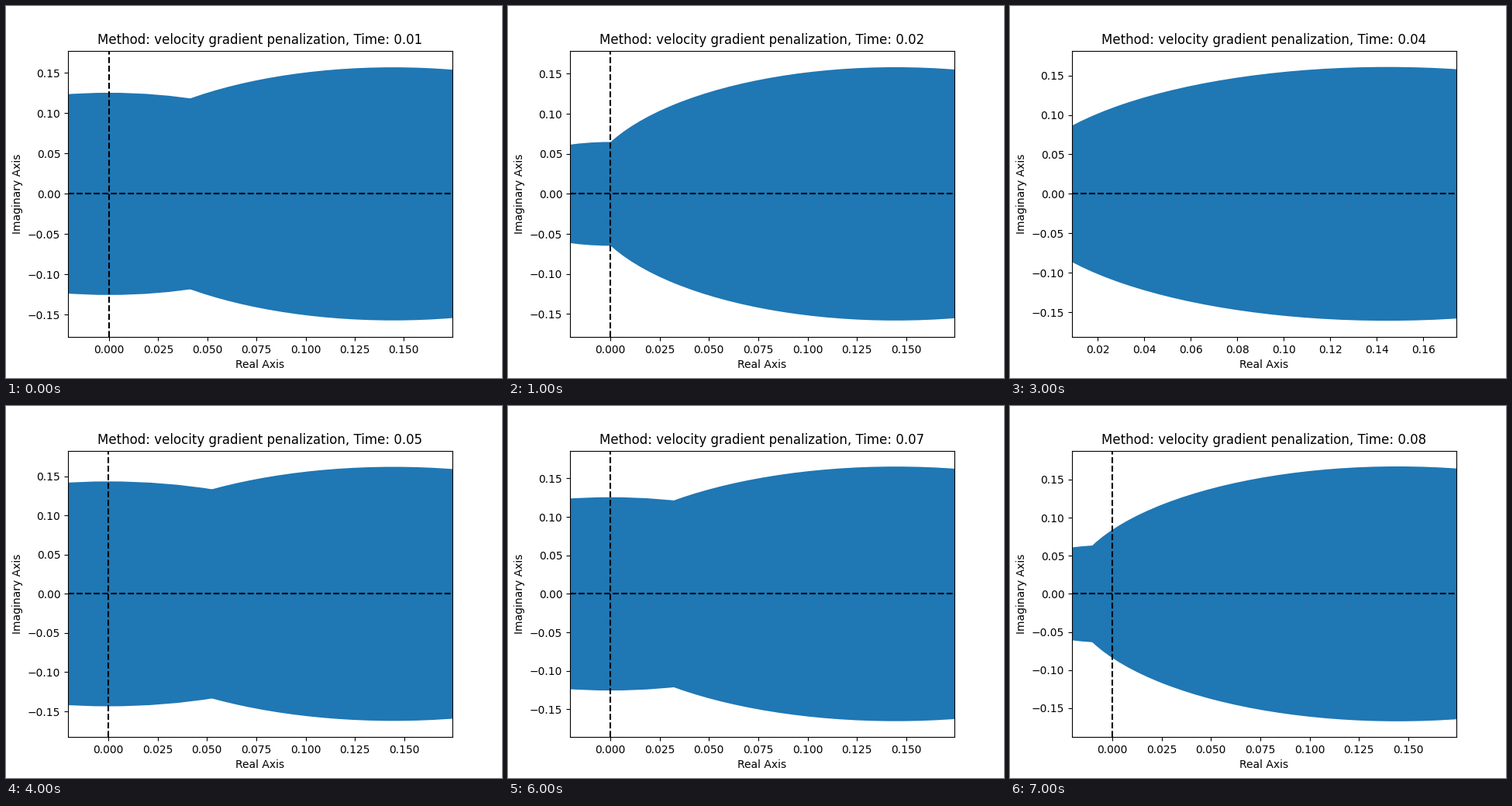
These frames come from a looping animation (640 by 480 pixels, 8 s). A matplotlib script:

```python
import matplotlib.pyplot as plt
from matplotlib.animation import FuncAnimation
from matplotlib.patches import Circle

STEPS = 8
CENTER = 0.1445      # real part of the large disc's centre
Y_MARGIN = 0.0207

FIRST = (-0.0209, 0.1747)
WIDE = (-0.0204, 0.1744)
NARROW = (0.0090, 0.1742)

# Horizontal view and radius of the disc at the origin, per time step
VIEWS = [FIRST, WIDE, NARROW, NARROW, WIDE, NARROW, WIDE, WIDE]
SMALL = [0.1255, 0.0648, 0.03, 0.03, 0.1435, 0.03, 0.1255, 0.0642]

fig, ax = plt.subplots(figsize=(6.4, 4.8), dpi=100)
ax.set_xlabel("Real Axis")
ax.set_ylabel("Imaginary Axis")
ax.axhline(0, color="black", linestyle="--", linewidth=1.5)
ax.axvline(0, color="black", linestyle="--", linewidth=1.5)


def add_disc(x):
    disc = Circle((x, 0), 0.1, facecolor="#1f77b4", linewidth=0)
    ax.add_patch(disc)
    return disc


small = add_disc(0)
large = add_disc(CENTER)
title = ax.set_title("")


def large_radius(step):
    return 0.1571 + 0.00101 * step + 0.00006 * step ** 2


def update(step):
    radius = large_radius(step)
    small.set_radius(SMALL[step])
    large.set_radius(radius)
    ax.set_xlim(VIEWS[step])
    ax.set_ylim(-radius - Y_MARGIN, radius + Y_MARGIN)
    time = 0.01 * (step + 1)
    title.set_text(f"Method: velocity gradient penalization, Time: {time:.2f}")
    return small, large, title


anim = FuncAnimation(fig, update, frames=STEPS, interval=1000,
                     repeat=True, repeat_delay=0, blit=False)
plt.show()
```
